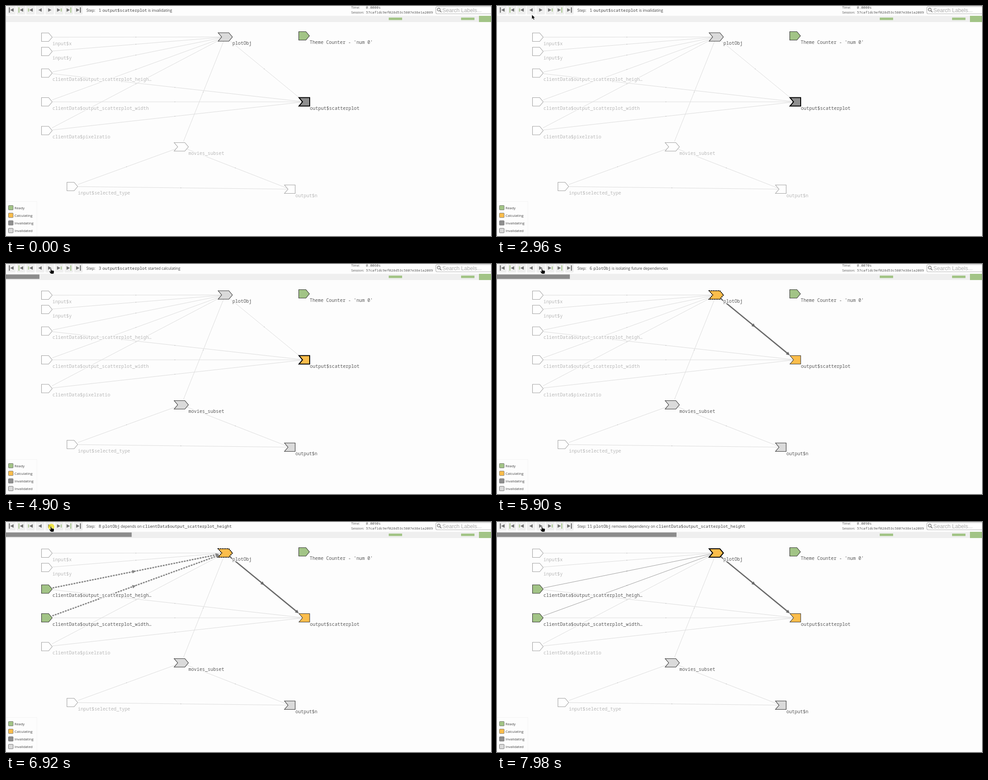
An HTML page with a canvas that plays this animation: 1086 px wide and 516 px high, repeating every 8000 ms.

```html
<!DOCTYPE html>
<html lang="en">
<head>
<meta charset="utf-8">
<title>Reactive graph playback</title>
<style>
html, body { margin: 0; width: 100%; height: 100%; overflow: hidden; background: #fdfdfd; }
canvas { display: block; }
</style>
</head>
<body>
<canvas id="stage" width="1086" height="516"></canvas>
<script>
const ctx = document.getElementById('stage').getContext('2d');
const LOOP = 8000, STEP_W = 40.2, BAR_MS = 250, PRESS_MS = 95;
const GREEN = '#a2c486', ORANGE = '#fbbd4b', DARK = '#8f8f8f', LIGHT = '#dadada';
const mono = size => `${size}px "Noto Sans Mono", "DejaVu Sans Mono", monospace`;
const sans = size => `${size}px "Open Sans", "Noto Sans", sans-serif`;

const HEIGHT = 'clientData$output_scatterplot_height';
const WIDTH = 'clientData$output_scatterplot_width';
// subject, action, object, time
const steps = [
  ['output$scatterplot', 'is invalidating', '', '0.0000'],
  ['output$n', 'is invalidating', '', '0.0020'],
  ['output$scatterplot', 'started calculating', '', '0.0060'],
  ['output$scatterplot', 'depends on', 'plotObj', '0.0060'],
  ['plotObj', 'started calculating', '', '0.0070'],
  ['plotObj', 'is isolating future dependencies', '', '0.0070'],
  ['plotObj', 'depends on', WIDTH, '0.0090'],
  ['plotObj', 'depends on', HEIGHT, '0.0090'],
  ['plotObj', 'stopped isolating future dependencies', '', '0.0090'],
  ['plotObj', 'removes dependency on', WIDTH, '0.0090'],
  ['plotObj', 'removes dependency on', HEIGHT, '0.0090']
];
const stepTime = n => n < 2 ? -BAR_MS : n === 2 ? 4150 : 4780 + (n - 3) * 372;

const shapes = {
  input: [[-12, -9.5], [4, -9.5], [12, 0], [4, 9.5], [-12, 9.5]],
  middle: [[-16, -9.5], [8, -9.5], [16, 0], [8, 9.5], [-16, 9.5], [-8, 0]],
  output: [[-12, -9.5], [12, -9.5], [12, 9.5], [-12, 9.5], [-4, 0]]
};
const node = (kind, x, y, label, fill = () => null) => ({ kind, x, y, label, fill });
const nodes = {
  x: node('input', 91.5, 70, 'input$x'),
  y: node('input', 91.5, 102, 'input$y'),
  height: node('input', 91.5, 150.5, HEIGHT, s => s > 7 && GREEN),
  width: node('input', 91.5, 215, WIDTH, s => s > 6 && GREEN),
  ratio: node('input', 91.5, 279.5, 'clientData$pixelratio'),
  type: node('input', 148.5, 405, 'input$selected_type'),
  theme: node('input', 667.5, 67, "Theme Counter - 'num 0'", () => GREEN),
  plot: node('middle', 491, 69.5, 'plotObj', s => s > 4 ? ORANGE : LIGHT),
  movies: node('middle', 392.5, 316, 'movies_subset', s => s > 1 && LIGHT),
  scatter: node('output', 668, 215, 'output$scatterplot', s => [DARK, LIGHT][s - 1] || ORANGE),
  n: node('output', 635.5, 411, 'output$n', s => s > 2 ? LIGHT : s > 1 && DARK)
};
const edges = ['x plot', 'y plot', 'height plot', 'width plot', 'ratio plot', 'height scatter',
  'width scatter', 'ratio scatter', 'movies plot', 'type movies', 'movies n', 'type n',
  'plot scatter'].map(e => e.split(' '));

// cursor: time, x, y
const path = [
  [760, 1034, 503], [910, 930, 430], [1070, 820, 362], [1220, 700, 318], [1380, 590, 285],
  [1530, 498, 258], [1620, 437, 247], [1700, 380, 246], [1780, 335, 262], [1850, 300, 290],
  [1930, 280, 313], [2080, 279, 313], [2200, 235, 240], [2350, 160, 130], [2500, 105, 50],
  [2640, 78, 20], [2960, 78, 19.5], [3360, 87, 16], [3510, 88, 15], [3730, 100.5, 10.5]
];

function text(str, x, y, font, color, halo) {
  ctx.font = font;
  if (halo) {
    ctx.strokeStyle = '#fdfdfd';
    ctx.lineWidth = 3;
    ctx.lineJoin = 'round';
    ctx.strokeText(str, x, y);
    ctx.lineJoin = 'miter';
  }
  ctx.fillStyle = color;
  ctx.fillText(str, x, y);
  return x + ctx.measureText(str).width;
}
function rect(x, y, w, h, color) {
  ctx.fillStyle = color;
  ctx.fillRect(x, y, w, h);
}
function poly(points, x, y, fill, stroke, width = 1) {
  ctx.beginPath();
  points.forEach(([px, py]) => ctx.lineTo(x + px, y + py));
  ctx.closePath();
  ctx.fillStyle = fill;
  ctx.fill();
  if (!stroke) return;
  ctx.strokeStyle = stroke;
  ctx.lineWidth = width;
  ctx.stroke();
}
function line(x1, y1, x2, y2, color, width) {
  ctx.strokeStyle = color;
  ctx.lineWidth = width;
  ctx.beginPath();
  ctx.moveTo(x1, y1);
  ctx.lineTo(x2, y2);
  ctx.stroke();
}
function circle(x, y, r) {
  ctx.beginPath();
  ctx.arc(x, y, r, 0, 2 * Math.PI);
}

function edgeState(from, to, step) {
  if (to === 'scatter' && from === 'plot') return step > 3 ? 'solid' : 'ghost';
  if (to !== 'plot') return 'ghost';
  const [start, end] = { width: [7, 10], height: [8, 11] }[from] || [99, 99];
  return step < start ? 'ghost' : step < end ? 'dashed' : 'faded';
}

function drawEdge([from, to], step) {
  const a = nodes[from], b = nodes[to], state = edgeState(from, to, step);
  const angle = Math.atan2(b.y - a.y, b.x - a.x), c = Math.cos(angle), s = Math.sin(angle);
  const thick = state === 'solid' || state === 'dashed';
  const tip = to === 'scatter' ? 16 : 14;
  const color = { ghost: '#dcdcdc', faded: '#9c9c9c', solid: '#6a6a6a', dashed: '#858585' }[state];
  const x1 = a.x + 13 * c, y1 = a.y + 13 * s;
  const end = thick ? tip + 3 : 6;
  ctx.setLineDash(state === 'dashed' ? [4, 2] : []);
  line(x1, y1, b.x - end * c, b.y - end * s, color, thick ? 2.8 : 1);
  ctx.setLineDash([]);
  const x2 = b.x - tip * c, y2 = b.y - tip * s, mx = (x1 + x2) / 2, my = (y1 + y2) / 2;
  if (!thick) return rect(mx - .7, my - .6, 1.4, 1.2, state === 'ghost' ? '#b5b5b5' : '#777');
  for (const [x, y] of [[mx, my], [x2, y2]]) {
    ctx.save();
    ctx.translate(x, y);
    ctx.rotate(angle);
    poly([[0, 0], [-8, -4], [-8, 4]], 0, 0, color);
    ctx.restore();
  }
}

function drawNode({ kind, x, y, label, fill }, step) {
  const color = fill(step), current = label === steps[step - 1][0];
  const isolating = current && step > 5 && step < 9;
  ctx.setLineDash(isolating ? [2.6, 1.4] : []);
  poly(shapes[kind], x, y, color || '#fefefe', current ? '#000' : color ? '#333' : '#a0a0a0', current ? 2 : 1.1);
  ctx.setLineDash([]);
  const cut = label === HEIGHT || (label === WIDTH && color);
  const shown = cut ? label.slice(0, 35) + '…' : label;
  text(shown, x + (kind === 'middle' ? 16 : 12.5), y + 17.5, mono(10.28), color ? '#5a5a5a' : '#b9b9b9', true);
}

function drawButtons(pressed) {
  // direction, marker colour, marker half height
  const icons = [[-1, '#666', 6], [-1, GREEN, 6], [-1, GREEN, 3.5], [-1], [1], [1, GREEN, 3.5], [1, GREEN, 6], [1, '#666', 6]];
  icons.forEach(([dir, color, half], i) => {
    const x = 12 + i * 21.45, shift = color ? -dir * 1.5 : 0;
    ctx.fillStyle = '#efefef';
    ctx.beginPath();
    ctx.roundRect(x - 9.5, -1, 19, 20, 2);
    ctx.fill();
    poly([[-3.5 * dir, -4], [4 * dir, 0], [-3.5 * dir, 4]], x + shift, 9, '#707070');
    if (color) rect(x + dir * 4.5 - 1, 9 - half, 2, half * 2, color);
  });
  if (pressed) {
    circle(101.5, 11, 7);
    ctx.fillStyle = 'rgba(240, 225, 20, .75)';
    ctx.fill();
  }
}

function drawHeader(step, barWidth, pressed) {
  rect(0, 22, 1086, 14, '#efefef');
  rect(0, 23.5, barWidth, 10, '#8c8c8c');
  rect(857, 26, 30, 5.5, GREEN);
  rect(1019, 26, 30, 5.5, GREEN);
  rect(1059, 22, 27, 14, GREEN);
  drawButtons(pressed);

  const [subject, action, object, time] = steps[step - 1];
  text('Step:', 180, 12.5, sans(8.5), '#444');
  ctx.textAlign = 'right';
  text(step, 213, 12.5, mono(9.25), '#444');
  ctx.textAlign = 'left';
  let x = text(subject, 216, 12.5, mono(9.25), '#444');
  x = text(action, x + 2, 12.5, sans(8.5), '#444');
  text(object, x + 2, 12.5, mono(9.25), '#444');

  text('Time:', 773, 6, sans(7.6), '#555');
  text(time + 's', 806, 6, mono(7.82), '#555');
  text('Session:', 773, 17, sans(7.6), '#555');
  text('57caf1dc9ef028d53c5807e38e1a2089', 806, 17, mono(7.82), '#555');

  ctx.beginPath();
  ctx.roundRect(962.5, 1.5, 126, 16, 3);
  ctx.fillStyle = '#fff';
  ctx.fill();
  ctx.strokeStyle = '#b5b5b5';
  ctx.lineWidth = 1.2;
  ctx.stroke();
  circle(969, 8, 3.2);
  ctx.strokeStyle = '#666';
  ctx.stroke();
  line(971.3, 10.3, 975, 14, '#666', 1.6);
  text('Search Labels...', 977, 13.5, '12.2px "Liberation Sans", Arial, sans-serif', '#ababab');
}

function drawLegend() {
  ctx.strokeStyle = '#f4f4f4';
  ctx.lineWidth = 1;
  ctx.strokeRect(-1, 438.5, 70, 80);
  [['Ready', GREEN], ['Calculating', ORANGE], ['Invalidating', DARK], ['Invalidated', LIGHT]].forEach(([name, color], i) => {
    const y = 447.5 + i * 17.1;
    ctx.beginPath();
    ctx.roundRect(5.5, y, 10.5, 10, 1);
    ctx.fillStyle = color;
    ctx.fill();
    ctx.strokeStyle = '#777';
    ctx.stroke();
    text(name, 19, y + 8, sans(7.9), '#444');
  });
}

function drawCursor(t) {
  if (t < path[0][0]) return;
  const i = path.findIndex(p => p[0] > t);
  let [, x, y] = path[path.length - 1];
  if (i > 0) {
    const [t0, x0, y0] = path[i - 1], [t1, x1, y1] = path[i], k = (t - t0) / (t1 - t0);
    x = x0 + (x1 - x0) * k;
    y = y0 + (y1 - y0) * k;
  }
  if (t < 3580) {
    poly([[0, 0], [0, 10], [2.3, 8], [4, 11.5], [5.8, 10.7], [4.3, 7.3], [7.3, 7]], x, y, '#000', '#fff', .6);
  } else {
    poly([[-1, 0], [1, 0], [1.4, 3.5], [6.5, 4.5], [7.3, 6.5], [6, 11.5], [0, 11.5], [-3.7, 6.5], [-2.8, 5.3], [-.6, 6.8]],
      x, y, '#000', '#fff', .5);
  }
}

function draw(now) {
  const t = now % LOOP;
  let step = 1;
  while (step < steps.length && t >= stepTime(step + 1)) step++;
  const k = Math.min(1, (t - stepTime(step)) / BAR_MS);
  const barWidth = step === 1 ? 0 : STEP_W * (step - 1 - (1 - k) ** 3);
  const pressed = step < steps.length && t > stepTime(step + 1) - PRESS_MS;

  rect(0, 0, 1086, 516, '#fdfdfd');
  edges.forEach(e => drawEdge(e, step));
  Object.values(nodes).forEach(n => drawNode(n, step));
  drawLegend();
  drawHeader(step, barWidth, pressed);
  drawCursor(t);
}

const start = performance.now();
function tick() {
  draw(performance.now() - start);
  requestAnimationFrame(tick);
}
tick();
</script>
</body>
</html>
```
